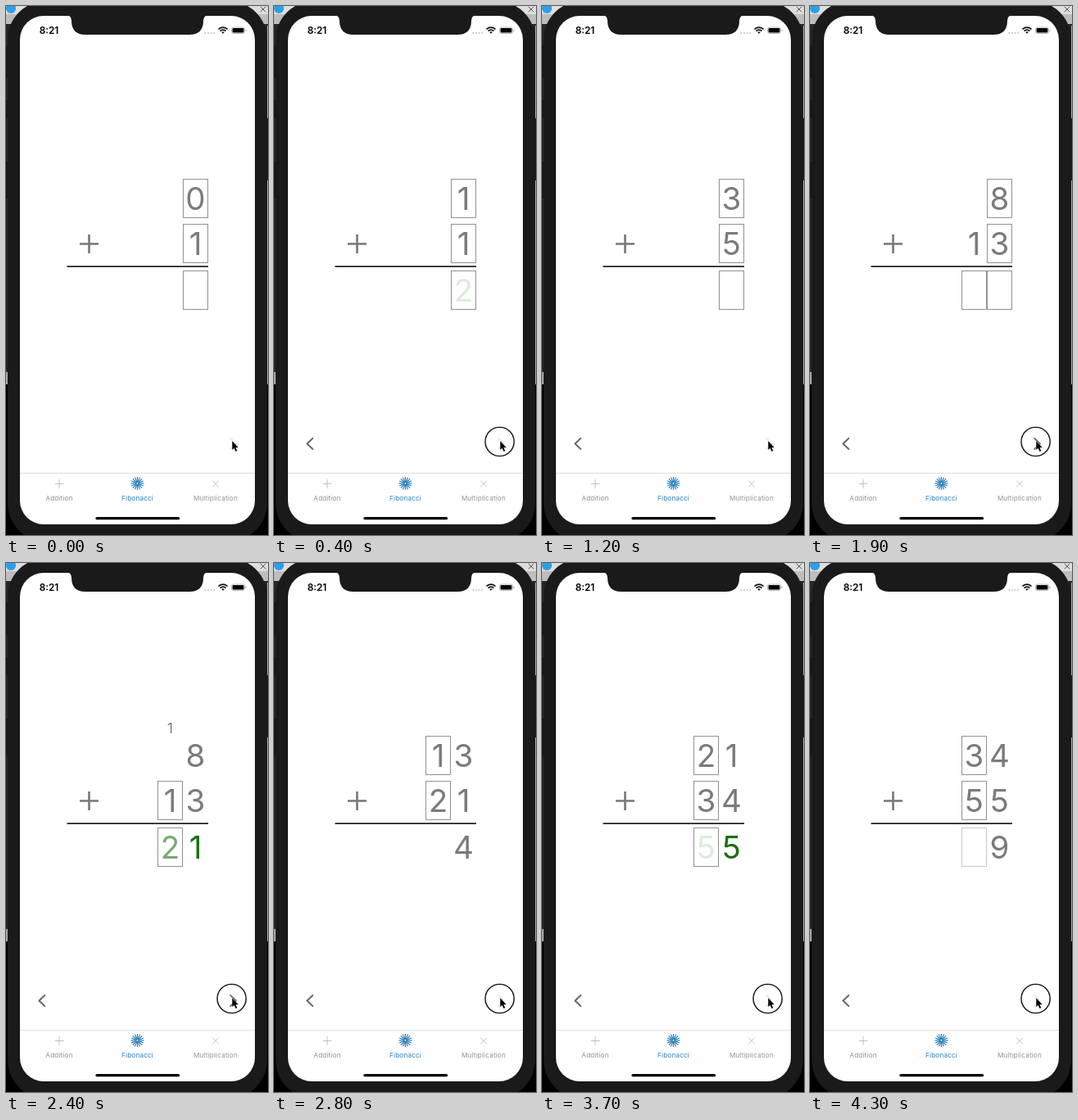
An HTML page that plays this animation: 320x646 px, repeating every 4400 ms.

```html
<!DOCTYPE html>
<html lang="en">
<head>
<meta charset="utf-8">
<title>Fibonacci addition</title>
<style>
  html, body { margin: 0; width: 100%; height: 100%; overflow: hidden; background: #000; }
  svg { display: block; width: 320px; height: 646px; }
  text { font-family: Inter, Roboto, sans-serif; text-anchor: middle; }
  .tab { font-size: 8.2px; letter-spacing: .15px; fill: #929292; }
  .digit { font-size: 38.5px; fill: #7b7b7b; }
  .carry { font-size: 17px; fill: #7b7b7b; }
  .line { fill: none; stroke-linecap: round; stroke-linejoin: round; }
  .box { fill: none; stroke: #929292; stroke-width: 1; }
</style>
</head>
<body>
<svg viewBox="0 0 320 646">
  <!-- desktop behind the phone -->
  <rect width="320" height="462" fill="#262626"/>
  <path d="M319 24h1v113h-1zM319 213h1v249h-1zM0 447h2v15h-2z" fill="#a8a8a8"/>
  <rect width="320" height="10" fill="#dedede"/>
  <rect y="10" width="320" height="12" fill="#bdbdbd"/>
  <circle cx="6" cy="3" r="6" fill="#2d9fe5"/>
  <path class="line" d="M311 1l6 6m0-6l-6 6" stroke="#555"/>

  <!-- phone -->
  <rect x="2" y="-6" width="317" height="660" rx="47" fill="#1a1a1a"/>
  <path d="M0 48h3v40h-3zM0 115h3v22h-3zM0 190h3v45h-3zM318 137h2v76h-2z" fill="#181818"/>
  <rect x="17" y="12" width="287" height="621" rx="29" fill="#fff"/>
  <path d="M74 11q6 1 6 7q0 17 17 17h127q17 0 17-17q0-6 6-7z" fill="#1a1a1a"/>

  <!-- status bar -->
  <text x="52.5" y="34" font-size="11.8" font-weight="600">8:21</text>
  <path d="M242.5 33h13" stroke="#bbb" stroke-width="1.7" stroke-dasharray="1.8 1.8"/>
  <g class="line" stroke="#111" stroke-width="1.7" style="stroke-linecap:butt">
    <path d="M259.5 28.3q5.5-4.4 11 0M261.5 30.5q3.5-2.8 7 0"/>
    <path d="M265 33.5l-1.4-1.6q1.4-1 2.8 0z" fill="#111" stroke-width=".5"/>
  </g>
  <rect x="275.5" y="26" width="16" height="7.5" rx="2.2" fill="#fff" stroke="#aaa" stroke-width=".8"/>
  <rect x="276.6" y="27" width="13.8" height="5.5" rx="1.2"/>
  <path d="M293 28.5v2.5" stroke="#aaa"/>

  <!-- sum layout -->
  <path d="M90 290.5h23M101.5 279v23" stroke="#777" stroke-width="2.6"/>
  <path d="M74.5 318.2h172.5" stroke="#222" stroke-width="1.7"/>
  <g id="sum"></g>

  <!-- tab bar -->
  <path d="M17 570.5h287" stroke="#dedede"/>
  <path class="line" d="M60 583.5h10M65 578.5v10M252.5 580l7 7m0-7l-7 7" stroke="#bcbcbc" stroke-width=".9"/>
  <g id="burst" stroke="#2e80bd" stroke-width="1.2"></g>
  <text class="tab" x="65" y="604.3">Addition</text>
  <text class="tab" x="160.5" y="604.3" style="fill:#2e80bd">Fibonacci</text>
  <text class="tab" x="256" y="604.3">Multiplication</text>
  <path class="line" d="M111 625.7h99.5" stroke="#000" stroke-width="3.3"/>

  <!-- navigation and pointer -->
  <path id="back" class="line" d="M47.2 528l-6.8 6.5 6.8 6.5" stroke="#666" stroke-width="1.9"/>
  <circle id="ring" cx="275.6" cy="532" r="17.6" fill="none" stroke="#111" stroke-width="1.4"/>
  <path id="next" class="line" d="M274.2 528l6.8 6.5-6.8 6.5" stroke="#666" stroke-width="1.9"/>
  <path d="M276.3 531.3v10.8l2.4-2.2 1.8 4.2 1.8-.8-1.8-4h3.3z" stroke="#fff" stroke-width=".6" paint-order="stroke"/>
</svg>
<script>
const LOOP = 4400, FRAME = 100;
const TAPS = [-90, 65, 215, 370, 518, 666, 814, 962, 1110, 1270, 1430, 1590, 1750, 1930,
  2100, 2270, 2440, 2610, 2780, 2960, 3140, 3315, 3490, 3670, 3865, 4060, 4260];
const ROW_TOP = [211.5, 266.5, 323.5];
const byId = id => document.getElementById(id);
const clamp = v => Math.max(0, Math.min(1, v));
const digitAt = (n, col) => [...String(n)].reverse()[col];
const columnX = col => 216.5 - 31 * col;

// Each column is first asked, then filled; the last one completes the sum.
function buildSteps(count) {
  const steps = [];
  for (let a = 0, b = 1; steps.length < count; [a, b] = [b, a + b]) {
    const columns = String(b).length;
    for (let col = 0, carry = 0; col < columns; col++) {
      const total = carry + Number(digitAt(a, col) || 0) + Number(digitAt(b, col));
      const step = { a, b, col, carry, total };
      steps.push({ ...step, filled: false, done: false },
                 { ...step, filled: true, done: col === columns - 1 });
      carry = Math.floor(total / 10);
    }
  }
  return steps;
}
const steps = buildSteps(TAPS.length);

const box = (row, col, alpha = 1) =>
  `<rect class="box" x="${columnX(col)}" y="${ROW_TOP[row]}" width="30" height="47" opacity="${alpha}"/>`;
const digit = (value, row, col, style = '') =>
  `<text class="digit" x="${columnX(col) + 15}" y="${ROW_TOP[row] + 37}" style="${style}">${value}</text>`;

function drawSum({ a, b, col, carry, total, filled, done }, age) {
  let out = '';
  [a, b].forEach((n, row) => {
    [...String(n)].reverse().forEach((d, c) => out += digit(d, row, c));
    if (digitAt(n, col)) out += box(row, col);
  });
  const colour = done ? 'fill:#1b7012' : '';
  for (let c = 0; c < col; c++) out += digit(digitAt(a + b, c), 2, c, colour);
  const boxAlpha = col && !filled ? clamp((age - 20) / 40) : 1;
  [...String(total)].reverse().forEach((d, i) => {
    out += box(2, col + i, boxAlpha);
    if (filled) out += digit(d, 2, col + i, `${colour};opacity:${clamp(age / 220)}`);
  });
  if (carry) out += `<text class="carry" x="${columnX(col) + 15}" y="208">${carry}</text>`;
  return out;
}

function render(t) {
  const index = TAPS.findLastIndex(tap => tap <= t);
  const age = t - TAPS[index];
  byId('sum').innerHTML = drawSum(steps[index], age);
  byId('ring').style.opacity = TAPS.some(tap => t >= tap - 60 && t < tap + 60) ? 1 : 0;
  byId('next').style.opacity = age < 95 ? 0.15 : 0.9;
  byId('back').style.opacity = clamp((t - TAPS[2]) / 100);
}

byId('burst').innerHTML = Array.from({ length: 16 }, (_, i) =>
  `<path d="M160.5 582v-7" transform="rotate(${i * 22.5} 160.5 583)"/>`).join('');

let shown = -1;
const start = performance.now();
function tick() {
  const t = Math.floor((performance.now() - start) % LOOP / FRAME) * FRAME;
  if (t !== shown) render(shown = t);
  requestAnimationFrame(tick);
}
tick();
</script>
</body>
</html>
```
